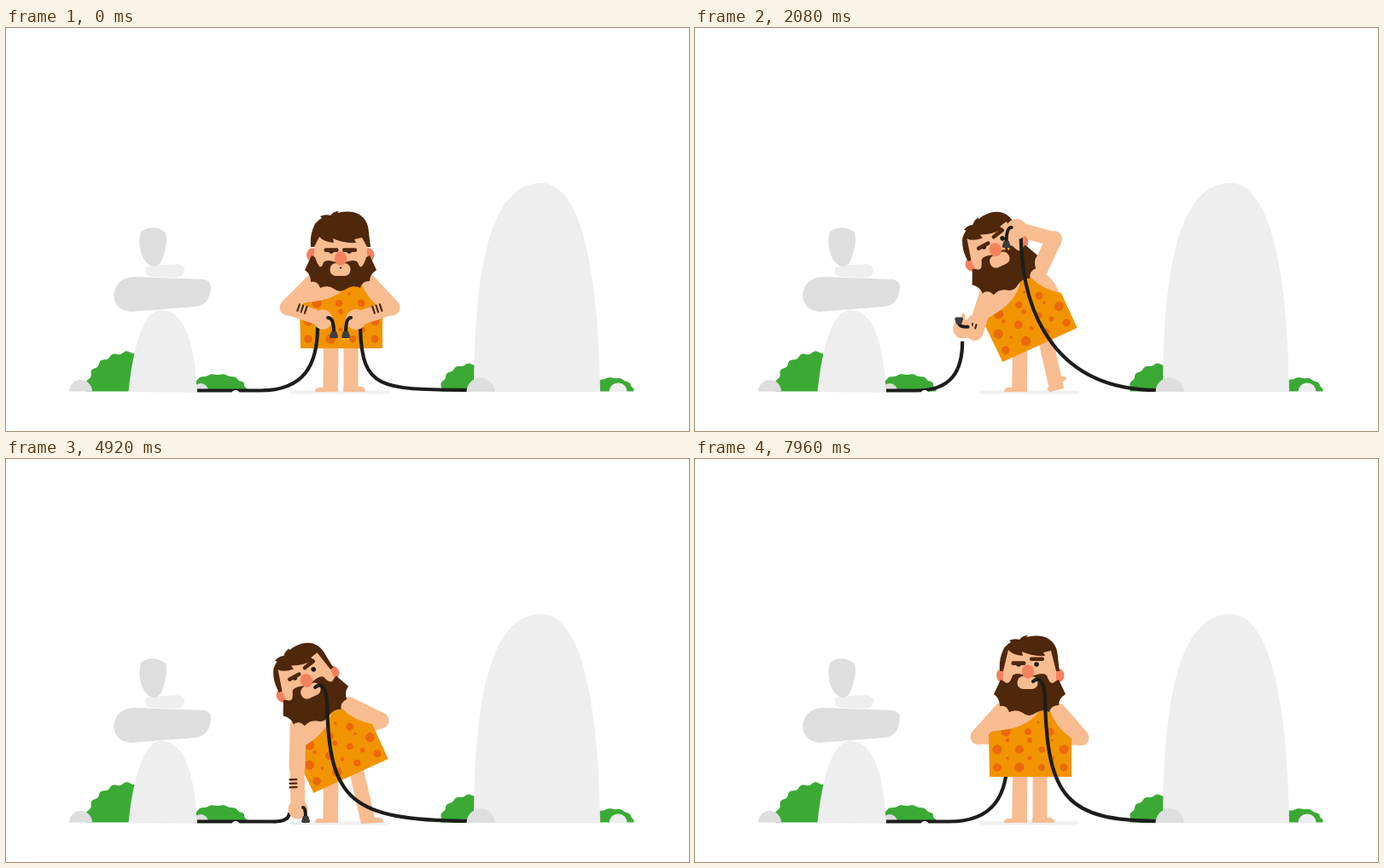
An HTML page with a canvas that plays this animation: 800 by 473 pixels, repeating every 8 s.

```html
<!DOCTYPE html>
<html lang="en">
<head>
<meta charset="utf-8">
<title>Caveman and cables</title>
<style>
html, body { margin: 0; width: 100%; height: 100%; overflow: hidden; background: #fff; }
canvas { display: block; width: 800px; height: 473px; }
</style>
</head>
<body>
<canvas id="stage"></canvas>
<script>
const LOOP = 8000;
const SKIN = '#f8bc91', HAIR = '#4f270a', BLUSH = '#f4815d', CABLE = '#1d1d1b';
const LIGHT = '#eeeeee', DARK = '#dedede', GREEN = '#3aaa35';
const HIDDEN = 14;

const canvas = document.getElementById('stage');
const ctx = canvas.getContext('2d');
const ratio = window.devicePixelRatio || 1;
canvas.width = 800 * ratio;
canvas.height = 473 * ratio;

// Elbows and hands are stage points; grips and plugs are offsets from the hand.
const hold = {
  lean: 0, crouch: 1, wink: 0, heel: 0, fingers: 0, slack: 1,
  leftElbow: [330, 328], leftHand: [371, 342], leftGrip: [-6, 8], leftPlug: [13, 15], leftBand: -4,
  rightElbow: [452, 328], rightHand: [410, 342], rightPlug: [-12, 15], rightBand: 4
};
const stretch = {
  ...hold, lean: 1, crouch: 0, heel: -40, slack: .4,
  leftElbow: [342, 358], leftHand: [352, 411], leftGrip: [-10, 4], leftPlug: [9, 9], leftBand: 5,
  rightElbow: [404, 240], rightHand: [378, 204], rightBand: HIDDEN
};
const bite = {
  ...stretch, fingers: 1, slack: .56,
  leftElbow: [320, 357], leftHand: [292, 320], leftGrip: [5, 21], leftPlug: [-12, -15], leftBand: 11,
  rightElbow: [430, 252], rightHand: [376, 254]
};
const fling = {
  ...stretch, heel: -3, slack: .82,
  leftElbow: [345, 352], leftHand: [356, 409],
  rightElbow: [446, 266], rightHand: [470, 212], rightBand: 4
};
const release = { ...fling, rightElbow: [446, 284], rightHand: [488, 311] };
const suck = {
  ...release, leftElbow: [341, 362], leftHand: [342, 411],
  rightElbow: [439, 307], rightHand: [405, 322], rightBand: HIDDEN
};
const rest = {
  ...suck, lean: 0, heel: 0, leftBand: HIDDEN,
  leftElbow: [332, 326], leftHand: [372, 328], leftGrip: [-6, 20],
  rightElbow: [452, 327], rightHand: [415, 328]
};
const peek = { ...rest, wink: 1 };

const timeline = [
  { pose: hold, from: 0, to: 120 },
  { pose: stretch, from: 620, to: 1760 },
  { pose: bite, from: 2300, to: 3450 },
  { pose: fling, from: 3800, to: 3800 },
  { pose: release, from: 4150, to: 4250 },
  { pose: suck, from: 4750, to: 5940 },
  { pose: rest, from: 6360, to: 7240 },
  { pose: peek, from: 7480, to: LOOP }
];

const mix = (a, b, u) => Array.isArray(a) ? a.map((v, i) => mix(v, b[i], u)) : a + (b - a) * u;
const add = (a, b) => [a[0] + b[0], a[1] + b[1]];

function poseAt(time) {
  const i = timeline.findIndex(key => time <= key.to);
  const next = timeline[i];
  if (time >= next.from) return next.pose;
  const last = timeline[i - 1];
  const u = (time - last.to) / (next.from - last.to);
  const pose = {};
  for (const name in hold) pose[name] = mix(last.pose[name], next.pose[name], u * u * (3 - 2 * u));
  return pose;
}

function shape(d, color) {
  ctx.fillStyle = color;
  ctx.fill(new Path2D(d));
}

function oval(x, y, rx, ry, color) {
  ctx.fillStyle = color;
  ctx.beginPath();
  ctx.ellipse(x, y, rx, ry, 0, 0, Math.PI * 2);
  ctx.fill();
}

function dome(x, y, r, color) {
  ctx.fillStyle = color;
  ctx.beginPath();
  ctx.arc(x, y, r, Math.PI, 0);
  ctx.fill();
}

function line(d, width, color, cap = 'round') {
  ctx.strokeStyle = color;
  ctx.lineWidth = width;
  ctx.lineCap = cap;
  ctx.lineJoin = 'round';
  ctx.stroke(new Path2D(d));
}

function bar(x, y, w, h, r, color) {
  ctx.fillStyle = color;
  ctx.beginPath();
  ctx.roundRect(x, y, w, h, r);
  ctx.fill();
}

function placed(x, y, angle, draw) {
  ctx.save();
  ctx.translate(x, y);
  ctx.rotate(angle);
  draw();
  ctx.restore();
}

const radians = degrees => degrees * Math.PI / 180;

function bush(x, rx, ry, waves) {
  ctx.fillStyle = GREEN;
  ctx.beginPath();
  for (let a = 0; a <= Math.PI; a += .02) {
    const swell = 1 + .03 * Math.sin(a * waves);
    ctx.lineTo(x + rx * swell * Math.cos(a), 426.5 - ry * swell * Math.sin(a));
  }
  ctx.fill();
}

function drawScene() {
  bush(145, 51, 46, 20);
  bush(248, 34, 20, 15);
  bush(545, 36, 32, 16);
  bush(710, 25, 16, 12);
  dome(87.5, 426.5, 13.5, DARK);
  dome(228, 426, 9, DARK);
  shape('M143.5 427C148 380 160 331 182 331C210 331 222 375 223.5 428Z', LIGHT);
  shape('M164 283Q164 279 172 279L200 277Q209 278 209 285Q207 293 199 293L170 292Q163 291 164 283Z', LIGHT);
  shape('M158 239Q172 229 187 240Q190 252 184 268Q181 280 173 280Q164 279 159 266Q154 252 158 239Z', DARK);
  shape('M150 292L232 295Q241 297 240 306Q238 325 222 327L146 333Q127 331 126 313Q129 293 150 292Z', DARK);
  shape('M548 427C548 290 565 182 627 182C677 182 694 300 696 427Z', LIGHT);
  dome(717, 427, 10.5, LIGHT);
  line('M335 427.5H448', 4, '#f0f0f0');
}

function drawLegs(lean, heel) {
  line('M381 355L380 427', 17.5, SKIN, 'butt');
  shape('M362 427Q362 422 367 422H389V427Z', SKIN);
  line(`M${404 + 4 * lean} 355L${404 + 20 * lean} 425`, 17, SKIN, 'butt');
  placed(395 + 21 * lean, 427 + lean, radians(heel), () => shape('M0 0V-6H22Q26 -5 26 0Z', SKIN));
}

function drawTorso() {
  shape('M366 280Q356 286 350 300L352 330H438Q443 308 424 286L418 280Z', SKIN);
  const pelt = new Path2D('M345 373L344 324Q346 319 352 319Q388 317 403 296H416Q422 314 441 328V373Z');
  ctx.save();
  ctx.fillStyle = '#f29400';
  ctx.fill(pelt);
  ctx.clip(pelt);
  // Staggered rows of large spots with small ones between them.
  for (let row = 0; row < 3; row++) {
    for (let col = 0; col < 4; col++) {
      const x = 354 + 26 * col + (row > 1 ? 10 : 0), y = 362 - 21 * row;
      oval(x, y, 4.8 + Math.sin(col * 2 + row), 4.8 + Math.sin(col * 2 + row), '#ea690b');
      const small = 1.8 + (col + row) % 3 * .6;
      oval(x + 12, y - 11, small, small, '#ea690b');
    }
  }
  ctx.restore();
}

function drawHead(p) {
  const look = 13 * p.crouch;
  const glance = -2 * p.wink;
  const raise = Math.max(p.lean, .8 * p.wink);
  const low = y => y + look;

  for (const x of [359, 424.5]) oval(x - glance / 2, 254 + look / 3, 7, 8, BLUSH);
  bar(361, 220, 62, 60, 4, SKIN);
  shape(`M357 249Q356 238 359 229Q362 219 370 215L368 213Q374 210 380 212Q384 207 390 207L388 209
    Q395 207 401 207.5C416 208 425 218 425 233L427 249H423L417 ${low(225)}L408 ${low(227)}L410 ${low(231)}
    Q395 ${low(232)} 383 ${low(226)}L384 ${low(231)}Q372 ${low(230)} 367 ${low(224)}L361 249Z`, HAIR);
  shape(`M358 259L350 276Q357 281 357 290Q365 288 368 297Q377 293 384 298Q391 304 399 298Q407 293 415 297
    Q417 289 426 289Q426 281 434 276L426 259L422 261Q416 ${low(267)} 412 ${low(254)}
    Q408 ${low(249)} 392 ${low(256)}Q376 ${low(249)} 372 ${low(254)}Q368 ${low(267)} 362 261Z`, HAIR);

  placed(glance, look, 0, () => {
    bar(379.5, 255, 24, 15, 7, SKIN);
    if (p.slack < .5) line('M381 257L387 253.5', 4, '#e30613');
    if (p.crouch > .5) oval(392, 260.5, 1.2, 1, CABLE);
    for (const x of [381, 402 + 3 * p.lean]) oval(x, 241, 2.8, 2.8, CABLE);
    placed(381, 239.6, radians(-4 * p.lean), () => bar(-8.5, -2.3, 17, 4.6, 2, HAIR));
    placed(402.5, 239.6 - 6 * raise, radians(-14 * p.lean), () => bar(-8.5, -2.3, 17, 4.6, 2, HAIR));
    oval(392, 249.5, 7.2, 8, BLUSH);
  });
}

function drawLimb(from, to, width) {
  line(`M${from}L${to}`, width, SKIN);
}

function drawForearm(elbow, hand, band) {
  drawLimb(elbow, hand, 17);
  const dx = hand[0] - elbow[0], dy = hand[1] - elbow[1];
  const inner = band - 4, outer = Math.min(band + 4, 9);
  if (inner >= outer) return;
  placed(...elbow, Math.atan2(dy, dx), () => {
    for (let i = -1; i <= 1; i++) {
      const x = Math.hypot(dx, dy) * .38 + i * 4.5;
      line(`M${x} ${inner}L${x} ${outer}`, 2.2, HAIR);
    }
  });
}

function drawFingers(hand, size) {
  for (const tip of [[1, -25], [15, -21]]) {
    line(`M${hand}L${add(hand, tip.map(v => v * size))}`, 6 * size, SKIN);
  }
}

function drawPlug(hand, side, [x, y], bare) {
  placed(...hand, 0, () => {
    line(`M${6 * side} -2Q${x} -2 ${x} ${y}`, 4, CABLE);
    if (bare) return;
    placed(x, y, Math.sign(y) * Math.PI / 2, () => {
      if (side < 0) line('M6 -2.5H9.5M6 2.5H9.5', 2, '#ffd500', 'butt');
      shape('M-1 -3L5 -5L7 -4V4L5 5L-1 3Z', '#3c3c3b');
    });
  });
}

function drawLeftCable([x, y]) {
  const h = 425 - y;
  line(`M224 425.5H${x - 12 - h * .75}C${x - h * .15 - 3} 426 ${x} ${425 - h * .42} ${x} ${y}`, 4.2, CABLE, 'butt');
}

function drawRightCable([x, y], slack, mouth) {
  const hook = mouth ? `M${mouth}C${add(mouth, [6, -5])} ${x - 1} ${y - 22} ${x} ${y}` : `M${x} ${y}`;
  const bend = 25 + 65 * (1 - slack) ** 2;
  line(`${hook}C${x + 2} ${y + slack * (425 - y)} ${x + bend} 424 540 425`, 4.2, CABLE);
}

function drawFrame(time) {
  const p = poseAt(time);
  const leftFront = time < 6160;
  const rightFront = time < 4400;
  const bitten = time > 2250;
  const inMouth = time > 3480;

  const body = new DOMMatrix()
    .translate(393 + 11 * p.lean, 373 - p.lean + 3 * p.crouch)
    .rotate(-24.5 * p.lean)
    .translate(-393, -373);
  const toStage = (x, y) => {
    const point = body.transformPoint({ x, y });
    return [point.x, point.y];
  };
  const inBody = draw => {
    ctx.save();
    ctx.transform(body.a, body.b, body.c, body.d, body.e, body.f);
    draw();
    ctx.restore();
  };
  const leftSide = () => {
    drawLeftCable(add(p.leftHand, p.leftGrip));
    drawLimb(toStage(361, 294), p.leftElbow, 19);
    drawForearm(p.leftElbow, p.leftHand, p.leftBand);
    oval(...p.leftHand, 11.5, 11.5, SKIN);
    if (p.fingers > 0) drawFingers(p.leftHand, p.fingers);
  };
  const rightForearm = () => drawForearm(p.rightElbow, p.rightHand, p.rightBand);
  const rightHand = () => oval(...p.rightHand, 12, 12, SKIN);

  ctx.setTransform(ratio, 0, 0, ratio, 0, 0);
  ctx.fillStyle = '#fff';
  ctx.fillRect(0, 0, 800, 473);
  drawScene();

  if (!leftFront) leftSide();
  drawLimb(toStage(425, 296), p.rightElbow, 19);
  if (!rightFront) {
    rightForearm();
    rightHand();
  }
  drawLegs(p.lean, p.heel);
  inBody(drawTorso);
  if (leftFront) {
    leftSide();
    drawPlug(p.leftHand, 1, p.leftPlug);
  }
  if (rightFront) rightForearm();
  inBody(() => {
    ctx.translate(0, 5 * p.crouch);
    drawHead(p);
  });

  if (inMouth) {
    const mouth = toStage(398 - 2 * p.wink, 261);
    drawRightCable(add(mouth, [14, 19]), p.slack, mouth);
  } else {
    drawRightCable(add(p.rightHand, [5, 11]), p.slack);
  }
  if (rightFront) rightHand();
  if (!inMouth) drawPlug(p.rightHand, -1, p.rightPlug, bitten);

  dome(556, 427, 16.5, DARK);
  dome(269, 430, 5, '#fff');
}

const start = performance.now();
function tick(now) {
  drawFrame(Math.max(0, now - start) % LOOP);
  requestAnimationFrame(tick);
}
drawFrame(0);
requestAnimationFrame(tick);
</script>
</body>
</html>
```
